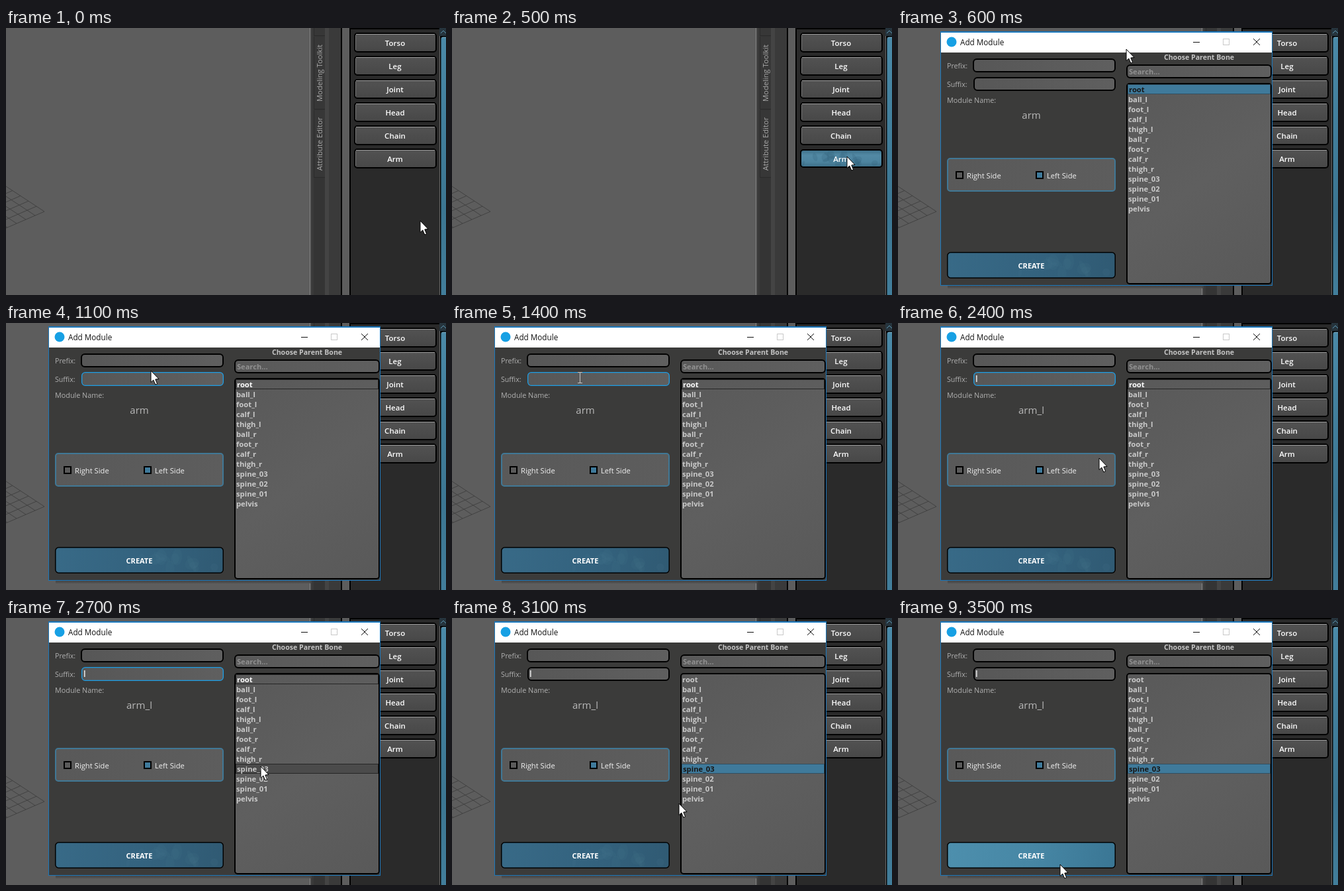
These frames come from a looping animation (665x403 px, 4 s). An HTML page with a canvas:

```html
<!DOCTYPE html>
<html>
<head>
<meta charset="utf-8">
<style>
html, body { margin: 0; width: 100%; height: 100%; overflow: hidden; background: #5d5d5d; }
canvas { display: block; }
</style>
</head>
<body>
<canvas id="stage" width="665" height="403"></canvas>
<script>
const ctx = document.getElementById('stage').getContext('2d');
const LOOP = 4000, STEP = 100;
const OPEN = 600, FOCUS = 1100, TYPED = 1600, PICK = 2900;
const MODULES = ['Torso', 'Leg', 'Joint', 'Head', 'Chain', 'Arm'];
const BONES = ['root', 'ball_l', 'foot_l', 'calf_l', 'thigh_l', 'ball_r', 'foot_r',
  'calf_r', 'thigh_r', 'spine_03', 'spine_02', 'spine_01', 'pelvis'];

// pointer stops: time, x, y
const PATH = [
  [0, 626, 291], [500, 597, 194], [600, 345, 32], [1200, 194, 80], [1900, 190, 86],
  [2000, 188, 127], [2400, 304, 204], [2700, 385, 224], [3000, 386, 229],
  [3300, 256, 381], [3500, 245, 372]
];

function pointerAt(t) {
  const i = PATH.findIndex(p => p[0] > t);
  if (i < 0) return PATH[PATH.length - 1].slice(1);
  const [t0, x0, y0] = PATH[i - 1], [t1, x1, y1] = PATH[i];
  const k = (t - t0) / (t1 - t0);
  return [Math.round(x0 + (x1 - x0) * k), Math.round(y0 + (y1 - y0) * k)];
}

const inside = ([px, py], x, y, w, h) => px >= x && px < x + w && py >= y && py < y + h;

function rect(x, y, w, h, fill) {
  ctx.fillStyle = fill;
  ctx.fillRect(x, y, w, h);
}

// rounded box whose border lies inside its bounds
function box(x, y, w, h, fill, border = '#000', line = 2, r = 5) {
  ctx.beginPath();
  ctx.roundRect(x + line / 2, y + line / 2, w - line, h - line, r);
  ctx.fillStyle = fill;
  ctx.fill();
  ctx.strokeStyle = border;
  ctx.lineWidth = line;
  ctx.stroke();
}

function text(s, x, y, color, size = 11, weight = 400, align = 'left') {
  ctx.font = `${weight} ${size}px "Open Sans", "Noto Sans", sans-serif`;
  ctx.textAlign = align;
  ctx.fillStyle = color;
  ctx.fillText(s, x, y);
}

function line(x0, y0, x1, y1, color) {
  ctx.beginPath();
  ctx.moveTo(x0, y0);
  ctx.lineTo(x1, y1);
  ctx.strokeStyle = color;
  ctx.lineWidth = 1;
  ctx.stroke();
}

function gradient(x0, y0, x1, y1, ...colors) {
  const g = ctx.createLinearGradient(x0, y0, x1, y1);
  colors.forEach((c, i) => g.addColorStop(i / (colors.length - 1), c));
  return g;
}

// seeded faint stains on a painted surface
function stains(x, y, w, h, color) {
  let seed = 7;
  const random = () => (seed = seed * 16807 % 2147483647) / 2147483647;
  ctx.save();
  ctx.beginPath();
  ctx.rect(x, y, w, h);
  ctx.clip();
  ctx.fillStyle = color;
  for (let i = 0; i < 14; i++) {
    ctx.beginPath();
    ctx.ellipse(x + random() * w, y + random() * h, w * (.03 + random() * .08),
      h * (.08 + random() * .2), random() * 3, 0, 7);
    ctx.fill();
  }
  ctx.restore();
}

function floorGrid() {
  for (let i = 0; i < 6; i++) {
    const ax = 58 - 12 * i, ay = 277 - 7.9 * i;
    const bx = 58 - 14 * i, by = 277 + 6 * i;
    line(ax, ay, ax - 58, ay + 25, '#424242');
    line(bx, by, bx - 58, by - 38, '#424242');
  }
}

function sideTab(label, top, bottom) {
  rect(465, top, 17, bottom - top, '#373737');
  line(465.5, top, 465.5, bottom, '#2b2b2b');
  line(465, bottom - .5, 482, bottom - .5, '#2b2b2b');
  ctx.save();
  ctx.translate(478, (top + bottom) / 2);
  ctx.rotate(-Math.PI / 2);
  text(label, 0, 0, '#a8a8a8', 11.2, 400, 'center');
  ctx.restore();
}

function moduleButton(name, y, hover) {
  if (hover) {
    box(526, y + 1, 125, 28, gradient(0, y, 0, y + 30, '#376880', '#5289a4', '#4d849f', '#376880'), '#000', 2, 4);
    stains(529, y + 4, 119, 22, 'rgba(35,80,105,.16)');
  } else {
    box(526, y, 125, 30, gradient(0, y, 0, y + 30, '#535353', '#474747'), '#000', 2, 4);
    line(529, y + 2.5, 648, y + 2.5, '#9c9c9c');
    line(528.5, y + 4, 528.5, y + 26, '#777');
  }
  text(name, 588, y + 20, '#fff', 11.5, 600, 'center');
}

function scrollbar() {
  rect(655, 0, 10, 12, '#26343d');
  line(657, 8, 661, 4, '#5c96b2');
  line(661, 4, 665, 8, '#5c96b2');
  rect(655, 12, 1, 391, '#6c6c6c');
  box(656, 12, 20, 410, gradient(0, 12, 0, 403, '#4b8aa8', '#427f9c', '#3c7692', '#427e9b'), '#000', 1.5, 4);
  line(659, 14.5, 665, 14.5, '#79a6bb');
}

function backdrop(pointer, open) {
  rect(0, 0, 665, 403, '#5d5d5d');
  floorGrid();

  rect(459, 0, 1, 403, '#858585');
  rect(460, 0, 28, 403, '#444');
  rect(462, 0, 20, 403, '#393939');
  rect(465, 0, 17, 403, '#343434');
  sideTab('', 0, 12);
  sideTab('Modeling Toolkit', 13, 123);
  sideTab('Attribute Editor', 124, 226);
  rect(488, 0, 18, 403, '#3a3a3a');
  rect(506, 0, 2, 403, '#000');

  rect(519, 0, 146, 403, '#000');
  rect(521, 2, 134, 401, '#2a2a2a');
  MODULES.forEach((name, i) => {
    const y = 7 + 35 * i;
    moduleButton(name, y, !open && inside(pointer, 526, y, 125, 30));
  });
  scrollbar();
}

function titleBar() {
  rect(64, 5, 502, 384, '#1b78bd');
  rect(65, 7, 500, 30, '#fff');
  ctx.beginPath();
  ctx.arc(81, 21, 7.5, 0, 7);
  ctx.fillStyle = '#17a0e4';
  ctx.fill();
  text('Add Module', 94, 26, '#111', 11.7);
  line(446, 21.5, 456, 21.5, '#111');
  ctx.strokeStyle = '#c9c9c9';
  ctx.strokeRect(491.5, 16.5, 9, 9);
  line(537, 16, 547, 26, '#111');
  line(547, 16, 537, 26, '#111');
}

function checkbox(x, label, fill) {
  box(x, 216, 12, 12, fill, '#000', 2, 0);
  text(label, x + 17, 227, '#f0f0f0', 11.2);
}

function createButton(hover) {
  const colors = hover ? ['#4d8fad', '#4787a5', '#3a7694'] : ['#386a87', '#34637f', '#305a73'];
  box(74, 338, 255, 40, gradient(74, 338, 329, 378, ...colors), '#000', 1.5, 5);
  if (!hover) stains(182, 342, 144, 33, 'rgba(75,125,150,.1)');
  text('CREATE', 201.5, 363, '#fff', 11, 700, 'center');
}

function boneList(t, pointer) {
  box(345, 83, 220, 304, gradient(345, 83, 565, 387, '#595959', '#5f5f5f', '#595959'), '#000', 2, 4);
  const chosen = t >= PICK ? 9 : t < FOCUS ? 0 : -1;
  BONES.forEach((name, i) => {
    const y = 85 + 15 * i;
    const selected = i === chosen;
    const hover = !selected && inside(pointer, 346, y, 217, 15);
    const current = i === 0 && t >= FOCUS && t < PICK;
    const framed = selected || hover || current;
    if (selected) rect(347, y, 216, 15, '#3f7a9b');
    if (hover) rect(347, y, 216, 15, '#4b4b4b');
    if (framed) {
      ctx.strokeStyle = '#252525';
      ctx.lineWidth = 1;
      ctx.setLineDash(selected ? [1, 1] : []);
      ctx.strokeRect(347.5, y + .5, 215, 14);
      ctx.setLineDash([]);
    }
    text(name, framed ? 349 : 348, y + 12,
      selected ? '#171717' : current ? '#fff' : '#cacaca', 11.25, 700);
  });
}

function dialog(t, pointer) {
  rect(75, 388, 385, 5, gradient(0, 388, 0, 393, '#414141', '#545454'));
  titleBar();
  rect(65, 37, 500, 351, '#3b3b3a');

  const field = gradient(113, 0, 329, 0, '#575757', '#5f5f5f');
  const focused = t >= FOCUS && t < PICK;
  const typed = t >= TYPED;
  text('Prefix:', 74, 61, '#b0b0b0', 10.6);
  box(113, 46, 216, 21, field);
  text('Suffix:', 74, 89, '#b0b0b0', 10.6);
  box(114, 74, 215, 21, field, focused ? '#1c9ee6' : '#000', focused ? 1.3 : 2);
  if (typed) text('l', 117, 89, '#e0e0e0', 11.5, 700);
  if (typed && focused && (t - TYPED) % 1200 < 600) rect(120, 78, 1, 14, '#eee');

  text('Module Name:', 74, 113, '#b0b0b0', 10.8);
  text(typed ? 'arm_l' : 'arm', 201.5, 137, '#b8b8b8', 15, 400, 'center');

  box(74, 196, 255, 51, gradient(74, 196, 329, 247, '#595959', '#5d5d5d'), '#407896', 2, 4);
  checkbox(87, 'Right Side', '#5a5a5a');
  checkbox(208, 'Left Side', '#3f7a9b');
  createButton(inside(pointer, 74, 338, 255, 40));

  text('Choose Parent Bone', 455, 48, '#c4c4c4', 10.6, 700, 'center');
  box(345, 55, 220, 21, gradient(345, 0, 565, 0, '#595959', '#5f5f5f'));
  text('Search...', 349, 70, '#909090', 11.1, 700);
  boneList(t, pointer);
}

function drawPointer([x, y], beam) {
  ctx.save();
  ctx.translate(x, y);
  if (beam) {
    line(.5, -7, .5, 8, '#c4c4c4');
    for (const end of [-7.5, 8.5]) line(-3, end, 4, end, '#c4c4c4');
  } else {
    ctx.beginPath();
    for (const p of [[0, 0], [0, 17.5], [3.8, 14], [6.8, 21], [9.6, 19.8], [6.8, 13], [12, 12.5]]) ctx.lineTo(...p);
    ctx.closePath();
    ctx.fillStyle = '#fff';
    ctx.fill();
    ctx.strokeStyle = '#000';
    ctx.lineWidth = 1;
    ctx.stroke();
  }
  ctx.restore();
}

function draw(now) {
  const t = Math.floor(now % LOOP / STEP) * STEP;
  const pointer = pointerAt(t);
  const open = t >= OPEN;
  backdrop(pointer, open);
  if (open) dialog(t, pointer);
  const beam = open && (inside(pointer, 113, 46, 216, 21) || inside(pointer, 114, 74, 215, 21));
  drawPointer(pointer, beam);
}

const start = performance.now();
function tick() {
  draw(performance.now() - start);
  requestAnimationFrame(tick);
}
tick();
</script>
</body>
</html>
```
